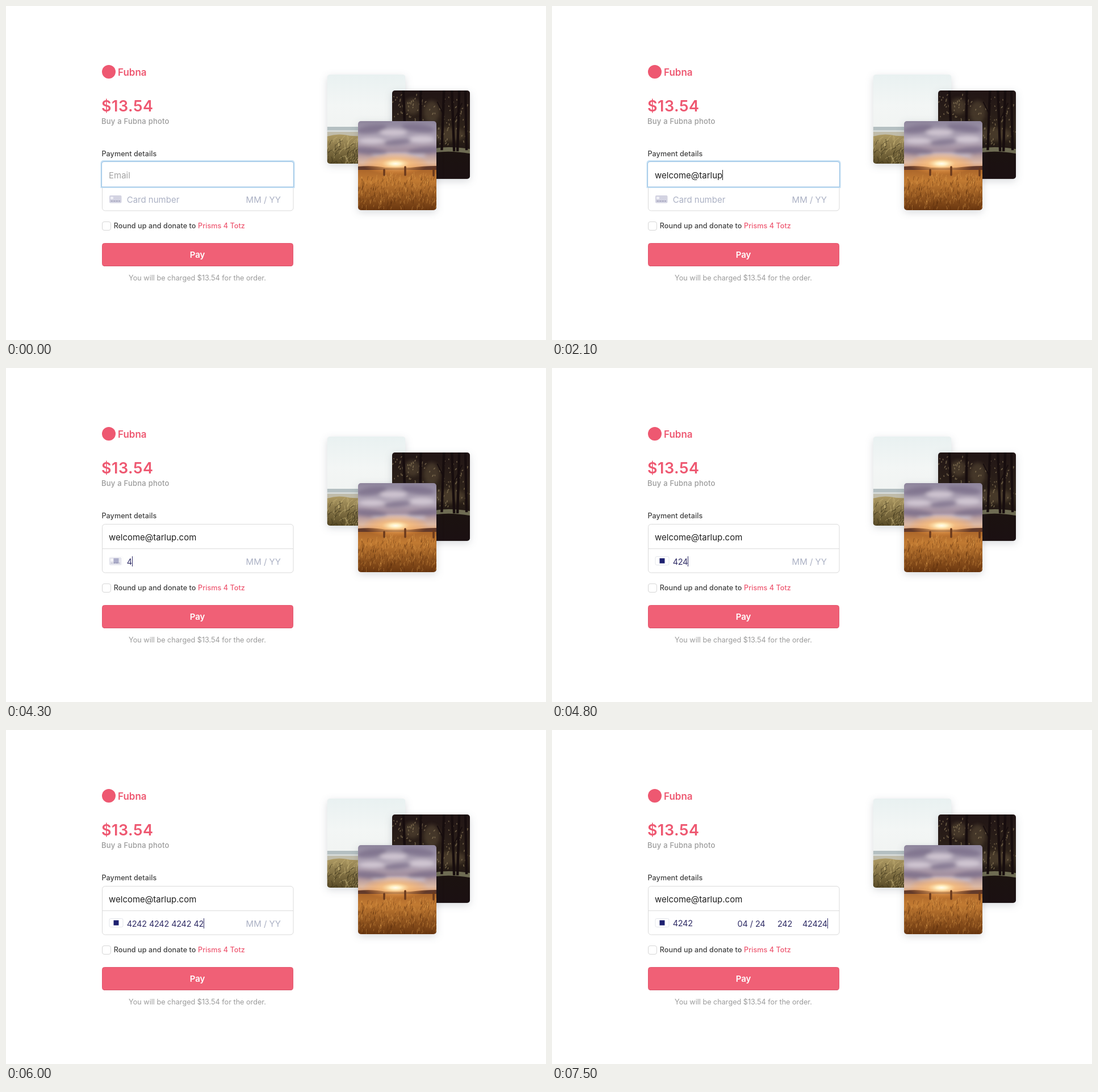
Recreate the animation shown at these times as an HTML page. Size 951x589 px, loop 8 s.

```html
<!DOCTYPE html>
<html lang="en">
<head>
<meta charset="utf-8">
<title>Checkout</title>
<style>
  html, body { margin: 0; width: 100%; height: 100%; overflow: hidden; background: #fff; }
  svg { display: block; width: 951px; height: 589px; }
  text { font-family: Inter, "Open Sans", sans-serif; white-space: pre; }
  .pink { fill: #ee5871; }
  .brand { font-size: 17px; font-weight: 600; }
  .price { font-size: 27px; font-weight: 600; letter-spacing: .5px; }
  .about { font-size: 13px; font-weight: 500; fill: #9b9b9b; letter-spacing: .23px; }
  .label { font-size: 12.6px; font-weight: 500; letter-spacing: .06px; }
  .dark { fill: #404040; }
  .pay { font-size: 15px; font-weight: 600; fill: #fff; text-anchor: middle; }
  .note { font-size: 12.65px; fill: #9b9b9b; text-anchor: middle; }
  .field { font-size: 15px; fill: #1f1f1f; }
  .digits { font-size: 14.5px; letter-spacing: -.3px; word-spacing: .5px; fill: #2f2c66; }
  .hint { font-size: 15px; letter-spacing: 0; word-spacing: 0; fill: #abb1c4; }
  .field.hint { fill: #a3a3a3; }
  .shadow { filter: drop-shadow(0 4px 7px rgba(30, 40, 60, .17)); }
  .line { fill: none; stroke: #dadada; }
</style>
</head>
<body>
<svg viewBox="0 0 951 589">
  <defs>
    <clipPath id="frame"><rect width="138" height="157" rx="5"/></clipPath>
    <clipPath id="slot"><rect x="212" y="328" width="275" height="28"/></clipPath>
    <linearGradient id="haze" x2="0" y2="1">
      <stop stop-color="#e9f1f1"/><stop offset=".35" stop-color="#f3f6f5"/><stop offset="1" stop-color="#eef0ee"/>
    </linearGradient>
    <linearGradient id="dune" x2="0" y2="1">
      <stop stop-color="#b09c65"/><stop offset="1" stop-color="#584a26"/>
    </linearGradient>
    <linearGradient id="woods" x2="0" y2="1">
      <stop stop-color="#211515"/><stop offset=".5" stop-color="#30251b"/><stop offset=".72" stop-color="#1b1210"/><stop offset="1" stop-color="#1b1012"/>
    </linearGradient>
    <linearGradient id="dusk" x2="0" y2="1">
      <stop stop-color="#8f869d"/><stop offset=".4" stop-color="#b3a8b8"/><stop offset=".62" stop-color="#a08c9c"/><stop offset=".85" stop-color="#dcb9a4"/><stop offset="1" stop-color="#dc9a64"/>
    </linearGradient>
    <linearGradient id="meadow" x2="0" y2="1">
      <stop stop-color="#a9642a"/><stop offset=".3" stop-color="#c17a32"/><stop offset="1" stop-color="#69360f"/>
    </linearGradient>
    <radialGradient id="sun">
      <stop stop-color="#fffdf0"/><stop offset=".16" stop-color="#ffefc0"/><stop offset=".42" stop-color="#ffbf72" stop-opacity=".65"/><stop offset="1" stop-color="#ff9838" stop-opacity="0"/>
    </radialGradient>
    <filter id="soft"><feGaussianBlur stdDeviation="3"/></filter>
  </defs>

  <circle cx="181" cy="116" r="12" class="pink"/>
  <text x="197" y="122.700" class="brand pink">Fubna</text>
  <text x="168" y="185.800" class="price pink">$13.54</text>
  <text x="168" y="208" class="about">Buy a Fubna photo</text>
  <text x="168.500" y="265" class="label dark">Payment details</text>

  <rect x="169.500" y="275.500" width="336.500" height="85.500" rx="5" class="line"/>
  <path d="M169.500 318.700H506" class="line"/>
  <g id="focus">
    <path d="M172 272H503Q508.500 272 508.500 277.500V321H166.500V277.500Q166.500 272 172 272Z" fill="#c6e0f4"/>
    <path d="M173 274.500H502Q506.500 274.500 506.500 279V319H168.500V279Q168.500 274.500 173 274.500Z" fill="#fff" stroke="#93bfe3"/>
  </g>
  <text id="email" x="181" y="303.500"></text>

  <g id="plainCard">
    <rect x="182" y="334" width="21.500" height="13.500" rx="2" fill="#d3d3e2"/>
    <rect x="184" y="336.500" width="5" height="4" rx="1" fill="#f2f2f8"/>
    <path d="M184.500 344H201" stroke="#9c9cb5" stroke-width="1.500" stroke-dasharray="3.500 1"/>
  </g>
  <g id="badge">
    <rect x="182" y="332.500" width="24" height="15" rx="2.500" fill="#fff" stroke="#e3e5ea"/>
    <rect x="189.500" y="335.500" width="9" height="9" fill="#1d2070"/>
  </g>
  <g clip-path="url(#slot)">
    <text id="card" y="346.500"></text>
    <text id="lastFour" y="345.700" class="digits"></text>
    <text id="expiry" y="346.500"></text>
    <text id="code" y="346.500"></text>
    <text id="zip" y="346.500"></text>
  </g>
  <rect id="caret" width="1" height="18"/>

  <rect x="169.500" y="380.500" width="15" height="15" rx="3.500" fill="#fff" stroke="#d6d6d6"/>
  <text x="189.800" y="392" class="label dark">Round up and donate to</text>
  <text x="338" y="392" class="label pink">Prisms 4 Totz</text>

  <rect x="169.500" y="418.500" width="336" height="40" rx="4" fill="#f06076" stroke="#e2586f"/>
  <path d="M172 458.500H503" stroke="#d75268"/>
  <text x="337" y="444" class="pay">Pay</text>
  <text x="337" y="483.500" class="note">You will be charged $13.54 for the order.</text>

  <g class="shadow"><g transform="translate(565.500 121)" clip-path="url(#frame)">
    <rect width="138" height="157" fill="url(#haze)"/>
    <rect y="92" width="138" height="7" fill="#b4bfc1"/>
    <rect y="98" width="138" height="4" fill="#d4d9d7"/>
    <rect y="101" width="138" height="9" fill="#c0bcaa"/>
    <path d="M0 109Q18 103 36 107T138 104V157H0Z" fill="url(#dune)"/>
    <path id="reeds" fill="none" stroke="#d3c082" stroke-width=".8" opacity=".65"/>
    <path id="stalks" fill="none" stroke="#3a3119" opacity=".7"/>
  </g></g>

  <g class="shadow"><g transform="translate(680 149) scale(.993)" clip-path="url(#frame)">
    <rect width="138" height="157" fill="url(#woods)"/>
    <g filter="url(#soft)" fill="#594834" opacity=".6">
      <ellipse cx="36" cy="28" rx="14" ry="14"/><ellipse cx="70" cy="38" rx="14" ry="20"/>
      <ellipse cx="100" cy="78" rx="30" ry="12"/>
    </g>
    <path id="leaves" fill="none" stroke="#94835f" stroke-width="1.700" opacity=".6"/>
    <path d="M76 103Q100 98 138 104V112Q105 106 76 110Z" fill="#7d7c5e" opacity=".85"/>
    <path d="M20 0L24 110M51 0L49 110M92 0L88 106M106 0L110 108M119 0L116 108M130 0L132 106" fill="none" stroke="#170d0e" stroke-width="4.500"/>
    <path d="M92 45L80 20M109 55L124 22" fill="none" stroke="#170d0e" stroke-width="2"/>
  </g></g>

  <g class="shadow"><g transform="translate(620 203)" clip-path="url(#frame)">
    <rect width="138" height="86" fill="url(#dusk)"/>
    <g filter="url(#soft)">
      <g fill="#d8ced9" opacity=".8">
        <ellipse cx="62" cy="20" rx="24" ry="6"/><ellipse cx="24" cy="35" rx="22" ry="5"/>
        <ellipse cx="112" cy="32" rx="22" ry="6"/><ellipse cx="72" cy="61" rx="48" ry="5"/>
      </g>
      <g fill="#776c87" opacity=".7">
        <ellipse cx="24" cy="14" rx="27" ry="7" transform="rotate(-8 24 14)"/>
        <ellipse cx="106" cy="12" rx="30" ry="7" transform="rotate(7 106 12)"/>
        <ellipse cx="70" cy="37" rx="24" ry="5" transform="rotate(-6 70 37)"/>
        <ellipse cx="20" cy="53" rx="32" ry="6" transform="rotate(6 20 53)"/>
        <ellipse cx="118" cy="52" rx="32" ry="6" transform="rotate(-6 118 52)"/>
      </g>
    </g>
    <rect y="83" width="138" height="74" fill="url(#meadow)"/>
    <path d="M0 80Q28 78 48 82H92Q116 79 138 79V86H0Z" fill="#633a2a"/>
    <ellipse cx="66" cy="75" rx="58" ry="20" fill="url(#sun)"/>
    <path id="wheat" fill="none" stroke="#e3a451" stroke-width=".8" opacity=".5"/>
    <path id="shade" fill="none" stroke="#52290b" stroke-width=".9" opacity=".45"/>
    <path d="M83 81V95M46 86V95M133 84V96" stroke="#6b3a1c" stroke-width="3.500" stroke-linecap="round"/>
  </g></g>
</svg>

<script>
const LOOP = 8000, STEP = 100, COLLAPSE = 6200;
const $ = id => document.getElementById(id);
const clamp = v => Math.max(0, Math.min(1, v));

// Seeded strokes that fill a box with a loose texture.
function strokes(id, count, seed, [x, y, w, h], lean, length) {
  const random = () => (seed = (seed * 16807) % 2147483647) / 2147483647;
  let d = '';
  for (let i = 0; i < count; i++) {
    const px = x + random() * w, py = y + random() * h;
    const dx = (random() - .3) * lean, dy = -length * (.4 + random() * .6);
    d += `M${px.toFixed(1)} ${py.toFixed(1)}q${(dx * .2).toFixed(1)} ${(dy * .7).toFixed(1)} ${dx.toFixed(1)} ${dy.toFixed(1)}`;
  }
  $(id).setAttribute('d', d);
}
strokes('reeds', 130, 71, [0, 116, 138, 50], 18, 14);
strokes('stalks', 130, 193, [0, 124, 138, 43], 16, 11);
strokes('leaves', 120, 507, [0, 8, 138, 90], 4, 4);
strokes('wheat', 210, 911, [0, 96, 138, 61], 4, 7);
strokes('shade', 190, 337, [0, 104, 138, 58], 4, 8);

const run = (from, count) => Array.from({ length: count }, (_, i) => from + i * STEP);

// A separator appears together with the digit before it.
const withGaps = times => times.flatMap((time, i) => i % 4 === 3 && i < 15 ? [time, time] : [time]);

const fields = {
  email: {
    x: 181, y: 289, style: 'field', hint: 'Email', text: 'welcome@tarlup.com',
    times: [500, 600, 600, 700, 800, 800, 900, 1300, ...run(1600, 6), 2300, ...run(2500, 3)]
  },
  card: {
    x: 212.7, y: 332, style: 'digits', hint: 'Card number', text: '4242 4242 4242 4242',
    times: withGaps([4300, ...run(4700, 11), ...run(5900, 4)])
  },
  expiry: {
    x: 326.6, y: 332, style: 'digits', hint: 'MM / YY', text: '04 / 24',
    times: [6300, 6400, 6400, 6400, 6400, 6500, 6600]
  },
  code: { x: 397, y: 332, style: 'digits', hint: 'CVC', text: '242', times: run(6800, 3) },
  zip: { x: 441, y: 332, style: 'digits', hint: 'ZIP', text: '42424', times: run(7100, 5) }
};

// Which field holds the caret from each moment on.
const carets = [
  [0, null], [200, 'email'], [3200, 'card'], [3700, null], [4200, 'card'],
  [COLLAPSE, 'expiry'], [6600, 'code'], [7000, 'zip']
];

function drawField(name, t, shift = 0) {
  const field = fields[name], node = $(name);
  const count = field.times.filter(time => time <= t).length;
  const value = count ? field.text.slice(0, count) : field.hint;
  if (node.textContent !== value) node.textContent = value;
  node.setAttribute('class', field.style + (count ? '' : ' hint'));
  const x = field.x + shift;
  node.setAttribute('x', x);
  field.end = x + (count ? node.getComputedTextLength() : 0);
}

// The full number slides left and fades, leaving its last group.
function collapseCard(rest) {
  const { x, text } = fields.card, card = $('card'), last = $('lastFour');
  card.textContent = text.slice(0, -4);
  last.textContent = text.slice(-4);
  const width = card.getComputedTextLength();
  card.setAttribute('x', x - width * (1 - rest));
  last.setAttribute('x', x + width * rest);
}

function draw(t) {
  const collapsed = t >= COLLAPSE;
  const rest = (1 - clamp((t - COLLAPSE) / 500)) ** 3;
  drawField('email', t);
  drawField('card', t);
  if (collapsed) collapseCard(rest);
  $('card').setAttribute('opacity', rest < .1 ? 0 : rest);
  $('lastFour').setAttribute('visibility', collapsed ? 'visible' : 'hidden');
  for (const name of ['expiry', 'code', 'zip']) drawField(name, t, 96 * rest);

  $('focus').setAttribute('opacity', t < 3200 ? 1 : t < 3300 ? .45 : 0);
  const known = t < 4300 ? 0 : clamp((t - 4200) / 400);
  $('badge').setAttribute('opacity', known);
  $('plainCard').setAttribute('opacity', 1 - known);

  const owner = carets.filter(([time]) => time <= t).pop()[1];
  const caret = $('caret');
  caret.setAttribute('visibility', owner ? 'visible' : 'hidden');
  if (owner) {
    caret.setAttribute('x', Math.round(fields[owner].end));
    caret.setAttribute('y', fields[owner].y);
    caret.setAttribute('fill', owner === 'email' ? '#1f1f1f' : '#2f2c66');
  }
}

const start = performance.now();
function tick() {
  const t = (performance.now() - start) % LOOP;
  draw(Math.floor(t / STEP) * STEP);
  requestAnimationFrame(tick);
}
tick();
</script>
</body>
</html>
```
